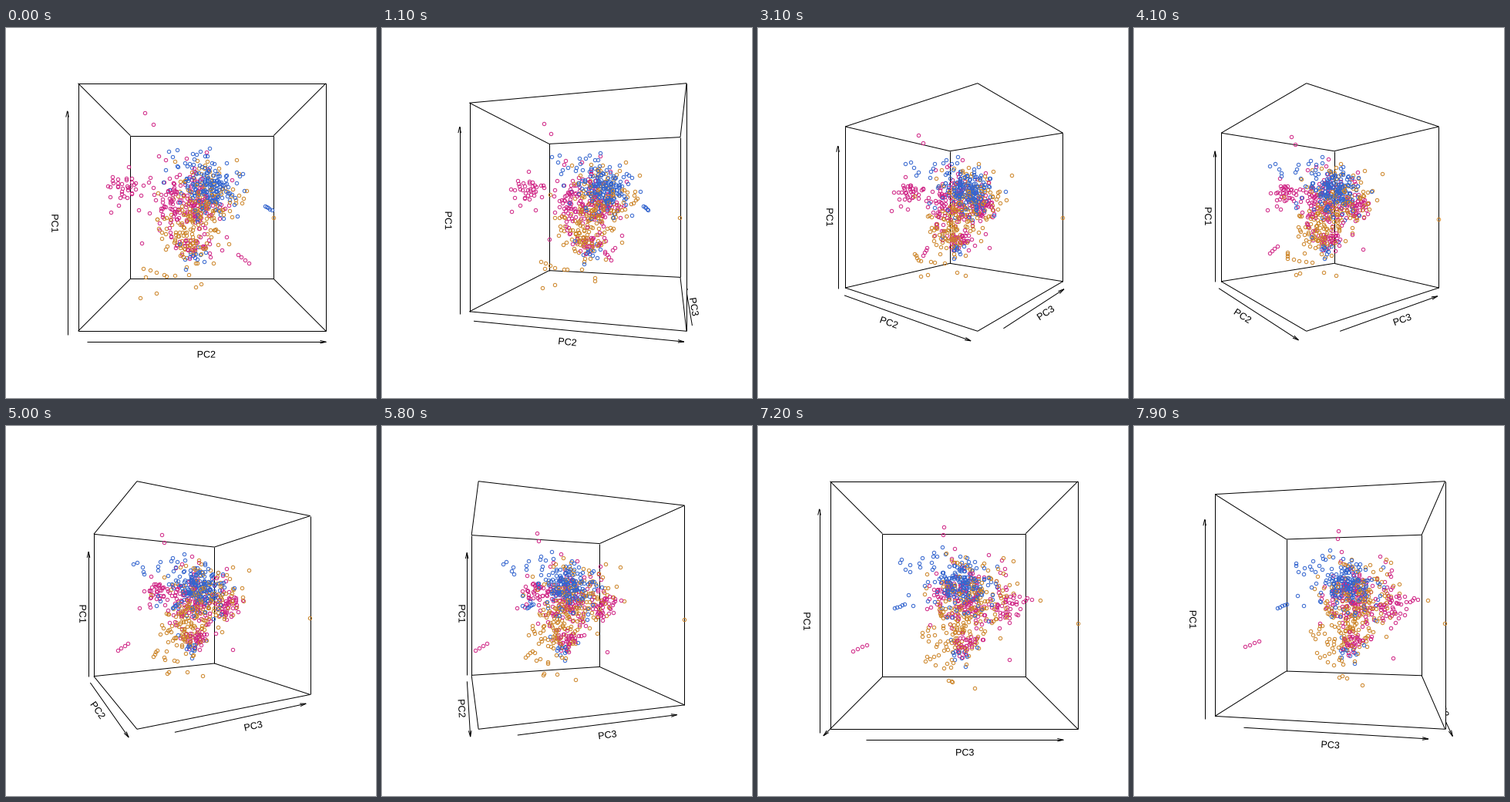
These frames come from a looping animation (480x480 px, 8 s). A matplotlib script:

```python
import itertools

import numpy as np
import matplotlib.pyplot as plt
from matplotlib.animation import FuncAnimation
from matplotlib.collections import LineCollection, PolyCollection
from matplotlib.patches import PathPatch
from matplotlib.textpath import TextPath
from matplotlib.transforms import Affine2D

SIZE, DPI = 480, 72
FRAMES, STEP = 80, 1.25             # degrees per frame
EYE = 1.867                         # eye distance from the cube centre
CX, CY, SIDE = 253.8, 232, 321.6    # box centre and height on screen
AXIS, LABEL = 0.531, 0.565          # offsets of arrows and titles

PINK, ORANGE, BLUE = "#d02686", "#cd8529", "#3566cf"

# Point coordinates are (PC2, PC1, PC3), each within +-0.5.
CLOUDS = [
    # colour, count, centre, spread
    (BLUE, 170, (0.03, 0.11, 0.04), 0.070),
    (BLUE, 12, (-0.03, -0.28, 0.04), 0.035),
    (ORANGE, 110, (0.02, 0.06, 0.11), 0.085),
    (ORANGE, 125, (-0.07, -0.15, 0.01), 0.080),
    (PINK, 130, (-0.10, 0.03, 0.08), 0.095),
    (PINK, 36, (-0.41, 0.12, -0.08), 0.055),
    (PINK, 45, (0.00, 0.00, 0.29), 0.055),
    (PINK, 35, (-0.04, -0.21, 0.05), 0.050),
]
STRANDS = [
    # colour, count, start, end
    (PINK, 4, (0.19, -0.227, -0.50), (0.153, -0.201, -0.438)),
    (PINK, 2, (-0.303, 0.50, -0.065), (-0.258, 0.438, -0.065)),
    (BLUE, 5, (0.305, 0.004, -0.228), (0.331, -0.015, -0.267)),
    (BLUE, 12, (-0.147, 0.222, -0.316), (0.02, 0.30, -0.08)),
    (ORANGE, 4, (-0.305, -0.32, -0.10), (-0.19, -0.34, -0.17)),
    (ORANGE, 2, (0.50, -0.075, 0.50), (-0.097, 0.027, 0.50)),
    (ORANGE, 1, (-0.336, -0.50, -0.01), (-0.336, -0.50, -0.01)),
]

# Arrow ranges along each axis
AXES = {"PC2": (-0.455, 0.489), "PC1": (-0.504, 0.379), "PC3": (-0.347, 0.431)}

CORNERS = np.array(list(itertools.product((-0.5, 0.5), repeat=3)))
EDGES = [(i, j) for i, j in itertools.combinations(range(8), 2)
         if np.sum(CORNERS[i] != CORNERS[j]) == 1]
FACES = [(0, 1, 3, 2), (4, 5, 7, 6), (0, 1, 5, 4),
         (2, 3, 7, 6), (0, 2, 6, 4), (1, 3, 7, 5)]
NEAR_EDGE = (4, 6)


def make_cloud():
    rng = np.random.default_rng(12)
    pts, cols = [], []
    for col, n, centre, spread in CLOUDS:
        blob = centre + spread * rng.standard_t(9, (n, 3))
        pts.append(np.clip(blob, -0.48, 0.48))
        cols += [col] * n
    for col, n, start, end in STRANDS:
        line = np.linspace(start, end, n)
        if n > 5:
            line += rng.normal(0, 0.03, line.shape)
        pts.append(line)
        cols += [col] * n
    return np.vstack(pts), np.array(cols)


def rotate(pts, th):
    x, y, p = np.asarray(pts, float).T
    c, s = np.cos(th), np.sin(th)
    z = s * x - c * p
    return np.column_stack([c * x + s * p, y]) / (EYE - z)[:, None], z


def make_view(th):
    """Projection to pixels, with the box fitted to a fixed height."""
    flat, z = rotate(CORNERS, th)
    k = SIDE * (EYE - z.max())
    mid = (flat[:, 0].min() + flat[:, 0].max()) / 2

    def view(pts):
        q, depth = rotate(pts, th)
        return np.column_stack([CX + k * (q[:, 0] - mid), CY - k * q[:, 1]]), depth
    return view


def axis_points(th):
    """Arrow ends and title spot of each axis, on the box edge that carries it."""
    c = np.cos(th)
    sides = [(0, -1, -1 if c >= 0 else 1),
             (-1 if EYE * c > 0.5 else 1, 0, -1),
             (1, -1, 0)]
    for i, (side, span) in enumerate(zip(np.array(sides), AXES.values())):
        ends = np.tile(side * AXIS, (2, 1))
        ends[:, i] = span
        spot = side * LABEL
        spot[i] = np.mean(span)
        yield ends, spot


def arrow(a, b, length=8, spread=np.radians(13)):
    back = np.arctan2(*(a - b)[::-1])
    barbs = [b + length * np.array([np.cos(back + t), np.sin(back + t)])
             for t in (-spread, spread)]
    return [(a, b), (barbs[0], b), (barbs[1], b)]


def make_title(text):
    """Text outline centred on the origin."""
    path = TextPath((0, 0), text, size=12.5, prop={"family": "Liberation Sans"})
    box = path.get_extents()
    path = path.transformed(Affine2D().translate(-(box.x0 + box.x1) / 2,
                                                 -(box.y0 + box.y1) / 2))
    return ax.add_patch(PathPatch(path, fc="black", lw=0, zorder=1))


points, colors = make_cloud()

fig = plt.figure(figsize=(SIZE / DPI, SIZE / DPI), dpi=DPI, facecolor="white")
ax = fig.add_axes([0, 0, 1, 1])
ax.set(xlim=(-0.5, SIZE - 0.5), ylim=(SIZE - 0.5, -0.5))
ax.axis("off")

line_style = dict(colors="black", linewidths=1)
arrows = ax.add_collection(LineCollection([], zorder=1, **line_style))
titles = [make_title(name) for name in AXES]
walls = ax.add_collection(PolyCollection([], facecolors="white",
                                         edgecolors="none", zorder=2))
box = ax.add_collection(LineCollection([], zorder=3, **line_style))
dots = ax.scatter(points[:, 0], points[:, 1], s=4.4 ** 2, facecolors="none",
                  edgecolors=colors, linewidths=1, zorder=4)


def update(frame):
    th = np.radians(frame * STEP)
    view = make_view(th)

    segs = []
    for title, (ends, spot) in zip(titles, axis_points(th)):
        a, b = view(ends)[0]
        segs += arrow(a, b)
        dx, dy = b - a
        angle = (np.degrees(np.arctan2(-dy, dx)) + 90) % 180 - 90
        place = Affine2D().rotate_deg(angle).scale(1, -1)
        title.set_transform(place.translate(*view([spot])[0][0]) + ax.transData)
    arrows.set_segments(segs)

    xy, _ = view(CORNERS)
    walls.set_verts([xy[list(f)] for f in FACES])
    hide = EYE * min(np.sin(th), np.cos(th)) > 0.5
    box.set_segments([xy[list(e)] for e in EDGES
                      if not (hide and e == NEAR_EDGE)])

    pix, depth = view(points)
    order = np.argsort(depth)
    dots.set_offsets(np.round(pix[order]))
    dots.set_edgecolors(colors[order])
    return [arrows, *titles, walls, box, dots]


anim = FuncAnimation(fig, update, frames=FRAMES, interval=100,
                     repeat=True, repeat_delay=0, blit=False)
plt.show()
```
